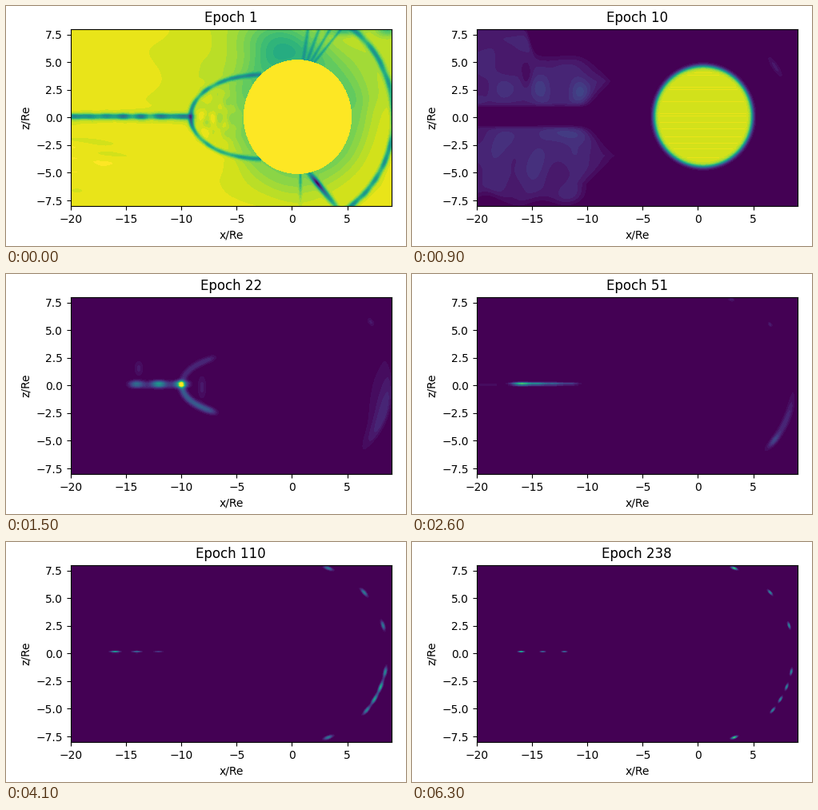
Recreate the animation shown at these times as a matplotlib script. Size 500 by 300 pixels, loop 6.4 s.

```python
import numpy as np
import matplotlib.pyplot as plt
from matplotlib.animation import FuncAnimation

W, H, DPI = 500, 300, 100
LEFT, BOTTOM, WIDE, HIGH = 80.6, 50, 401.4, 221.4
FRAMES, INTERVAL = 64, 100
LEVELS = 30
CX, CY = 363.5, 139      # centre of the planet
TAIL_Y = 138
BOW = 112                # distance of the bow specks from the planet

# Stage pixel coordinates of the plot area, also as polar ones round the planet
Y, X = np.mgrid[29:250, 81:482] + 0.5
R = np.hypot(X - CX, Y - CY)
A = np.degrees(np.arctan2(Y - CY, X - CX))


def soft(d):
    """Smooth step from 0 to 1 around d = 0."""
    return 0.5 + 0.5 * np.tanh(d / 2)


def bell(d, width):
    return np.exp(-0.5 * (d / width) ** 2)


def blob(x, y, sx, sy, angle=0):
    a = np.radians(angle)
    u = (X - x) * np.cos(a) + (Y - y) * np.sin(a)
    v = (Y - y) * np.cos(a) - (X - x) * np.sin(a)
    return bell(u, sx) * bell(v, sy)


def noise(seed, wx, wy, waves=9):
    """Smooth bumps between about -1 and 1 with the given wavelengths."""
    rng = np.random.default_rng(seed)
    out = np.zeros_like(X)
    for a, p in rng.uniform(0, 2 * np.pi, (waves, 2)):
        out += np.sin(2 * np.pi * (X / wx * np.cos(a) + Y / wy * np.sin(a)) + p)
    return out / np.sqrt(waves)


def inside(rx, ry, cx=CX, cy=CY):
    """Distance in pixels to an ellipse, positive inside."""
    f = 1 - np.hypot((X - cx) / rx, (Y - cy) / ry)
    gy, gx = np.gradient(f)
    return f / (np.hypot(gx, gy) + 1e-6)


def lobe(tip, rx, ry, width):
    """Half-ellipse outline that opens from the tail towards the planet."""
    cx = tip + rx
    return bell(inside(rx, ry, cx), width) * (X < cx)


def tail(x, step, amps, sx, sy, y=TAIL_Y):
    """Evenly spaced knots along the tail."""
    return sum(amp * blob(x + step * k, y, sx, sy) for k, amp in enumerate(amps))


def bow(angle, length, width):
    """Dash lying on the bow circle."""
    return bell(R - BOW, width) * bell(np.radians(A - angle) * BOW, length)


def bow_specks(length, width):
    return sum(bow(a, length, width) for a in (-70, -42, -17.5, 12, 22, 31, 39.5, 70))


def crescent(edge, cy, height):
    """Light between a straight left edge and the bow, brightest near the bow."""
    rim = CX + np.sqrt(np.maximum(117 ** 2 - (Y - CY) ** 2, 0))
    u = np.clip((X - edge) / (rim - edge + 4), 0, 1)
    return u ** 1.3 * soft((rim - X) / 1.5) * bell(Y - cy, height)


def clouds(seed):
    """Hazy regions above and below the tail."""
    roof = 24 + 42 * soft((X - 147) / 3)
    upper = soft((126 - Y) / 1.5) * soft((Y - roof) / 4)
    upper *= soft((244 - 0.9 * np.abs(Y - 95) - X) / 5)
    upper *= 1 - 0.6 * blob(143, 86, 5, 12)
    reach = 250 - np.minimum(np.abs(Y - 187), 35)
    floor = 242 + 5 * noise(seed, 60, 400)
    lower = soft((Y - 151) / 1.5) * soft((reach - X) / 5) * soft((floor - Y) / 4)
    rough = 1 + 0.15 * noise(seed + 1, 50, 50)
    return upper * rough, lower * rough


def start_field():
    rim = -inside(67.5, 71)
    near = soft((X - 270) / 10)
    v = 0.95 + 0.008 * noise(1, 90, 60)
    v += 0.02 * noise(2, 90, 16) * bell(Y - 185, 20) * soft((200 - X) / 10)
    v -= 0.05 * soft((X - 205 + 0.2 * (Y - 60)) / 12) * soft((125 - Y) / 8)
    v -= near * (0.11 * bell(rim, 16) + 0.05 * bell(rim, 40))
    v -= 0.18 * blob(338, 46, 30, 24)
    v -= 0.03 * (1 + noise(3, 14, 20)) * blob(258, CY, 18, 22)

    rough = 1 + 0.25 * noise(4, 20, 25)
    sheet = soft((234 - X) / 2)
    v -= rough * sheet * (0.36 * bell(Y - 138.5, 1.9) + 0.1 * bell(Y - CY, 4.5))
    v -= rough * (0.32 * lobe(231, 87, 52, 1.9) + 0.3 * blob(232, 139, 2.5, 7))
    v -= rough * (X > 405) * 0.36 * bell(inside(120, 133), 2.4)
    v -= 0.2 * rough * blob(422, 32, 14, 4) + 0.2 * blob(476, 30, 10, 6)
    # Cusp rays above and below the planet
    for k in range(4):
        lean = CX + 7 + 5 * k + (0.15 + 0.22 * k) * (70 - Y)
        v -= 0.16 * bell(X - lean, 1.5) * (Y < 74)
    v -= 0.18 * bell(X - 367, 1.3) * bell(Y - 215, 16) * (Y > CY)
    cusp = blob(395, 230, 21, 2.4, 51)
    v -= 0.5 * cusp + 0.38 * blob(388, 221, 7, 2, 51)
    return np.where(rim < 0, 1, np.clip(v, 0, 0.99))


def early_field():
    upper, lower = clouds(5)
    spots = tail(113, 49, (0.06, 0.13, 0.14), 9, 13, 106)
    low_spots = 0.1 * blob(195, 158, 18, 8) + 0.03 * blob(135, 180, 35, 18)
    v = upper * (0.095 + spots) + lower * (0.105 + low_spots)
    v += 0.08 * blob(453, 77, 11, 3, 57)
    stripes = 0.02 * (np.sin(Y * 2.1) * np.sin(Y * 0.37 + 1) > 0.7)
    return np.maximum(v, soft(inside(61.5, 62.5, 363, 138.5) / 1.5) * (0.92 + stripes))


def middle_field():
    upper, lower = clouds(7)
    v = 0.055 * upper + 0.05 * lower + 0.05 * blob(215, 180, 32, 20, 30)
    cut = soft((126 - Y) / 1.2)
    v += cut * tail(113, 52.5, (0.12, 0.58, 0.6), 6.5, 7, 116)
    v += cut * (tail(113, 52.5, (0.16, 0.08, 0.12), 8, 18, 98)
                + 0.16 * blob(230, 105, 10, 8, -30))
    v += 0.5 * blob(223, 157, 9, 4, 47) + 0.2 * blob(227, 161, 16, 8, 45)
    v += tail(161, 27, (0.13, 0.2), 7, 3.5, 147)
    v += 0.17 * lobe(247, 32, 34, 3.5) + 0.28 * blob(280, CY, 6, 12, 10)
    v += 0.95 * crescent(438, 163, 32) + 0.14 * crescent(434, 140, 55)
    disc = 0.485 * soft(inside(66.5, 66, CX, 138) / 1.6)
    return np.maximum(np.minimum(v, 0.98), disc)


def fork_field():
    v = tail(163, 28, (0.25, 0.42, 0.5), 6, 2.6) + 0.4 * blob(219, TAIL_Y, 2.5, 2.5)
    v += 0.12 * bell(Y - CY, 3) * soft((X - 156) / 3) * soft((222 - X) / 2)
    side = np.where(Y < CY, 0.13, 0.3)
    v += side * lobe(220, 80, 38, 3) * soft((260 - X) / 3)
    v += 0.08 * (blob(166, 119, 4, 7) + blob(245, 142, 4, 10) + blob(455, 61, 2.5, 4, -35))
    v += 0.13 * crescent(438, 165, 38) + 0.05 * bow(25, 26, 6)
    return v


def streak_field():
    v = tail(137, 20, (0.72, 0.45, 0.3, 0.2), 8, 1.2) + 0.07 * blob(95, 139, 10, 1)
    v += 0.13 * bow(25, 24, 3.2) + 0.14 * bow(38, 7, 2.5)
    return v + 0.1 * (bow(-42, 2.5, 1.5) + bow(-72, 3, 2))


def dash_field():
    v = tail(136.5, 27, (0.65, 0.38, 0.2), 3.5, 0.7)
    return v + 0.42 * bow_specks(3.8, 1.4) + 0.22 * bow(25, 16, 1.2)


def final_field():
    v = tail(136.5, 27, (0.8, 0.38, 0.42), 2.2, 0.6)
    return v + (0.5 + 0.25 * (np.abs(A) > 60)) * bow_specks(2.6, 1)


def epoch_at(i):
    """The sampling stride grows by one epoch every ten frames."""
    return 1 + sum(1 + k // 10 for k in range(1, i + 1))


STAGES = {1: start_field, 10: early_field, 18: middle_field, 22: fork_field,
          51: streak_field, 110: dash_field, 238: final_field}
FIELDS = [make() for make in STAGES.values()]


def field_at(epoch):
    """Blend neighbouring stages along the logarithm of the epoch."""
    pos = np.interp(np.log(epoch), np.log(list(STAGES)), range(len(FIELDS)))
    k = min(int(pos), len(FIELDS) - 2)
    s = pos - k
    a, b = FIELDS[k], FIELDS[k + 1]
    v = (1 - s) * a + s * b
    return v * ((1 - s) * a.max() + s * b.max()) / v.max()


def banded(v):
    return np.clip(np.floor(v * LEVELS), 0, LEVELS - 1) / (LEVELS - 1)


fig = plt.figure(figsize=(W / DPI, H / DPI), dpi=DPI)
ax = fig.add_axes([LEFT / W, BOTTOM / H, WIDE / W, HIGH / H])
image = ax.imshow(banded(FIELDS[0]), cmap="viridis", vmin=0, vmax=1,
                  extent=(-20, 9, -8, 8), aspect="auto", interpolation="nearest")
ax.set_xticks(range(-20, 6, 5))
ax.set_yticks(np.arange(-7.5, 8, 2.5))
ax.set_xlabel("x/Re")
ax.set_ylabel("z/Re")
title = ax.set_title("Epoch 1")


def draw(i):
    epoch = epoch_at(i)
    image.set_data(banded(field_at(epoch)))
    title.set_text(f"Epoch {epoch}")
    return image, title


anim = FuncAnimation(fig, draw, frames=FRAMES, interval=INTERVAL, repeat=True,
                     blit=False)
plt.show()
```
